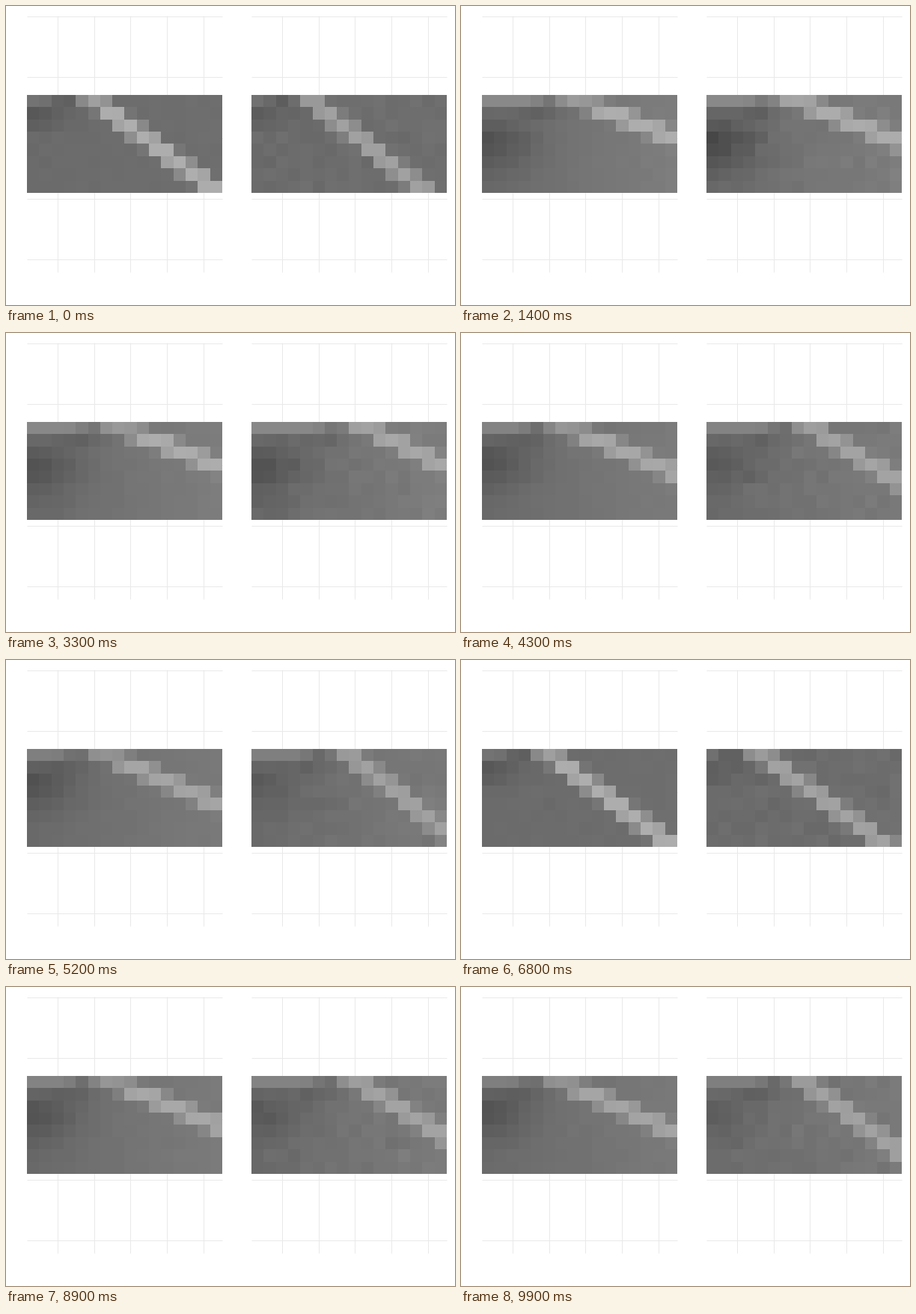
A matplotlib script for the animation above (10 s loop, 600 by 400 pixels).

```python
import numpy as np
import matplotlib.pyplot as plt
from matplotlib.animation import FuncAnimation

W, H, DPI = 600, 400, 100
COLS, ROWS = 16, 8
FRAMES, STEP = 100, 100
PANELS = (28.3, 328.3)
TOP, BOTTOM, WIDTH = 119.3, 249.8, 260.9

# Key moments in seconds; tilt runs from 0 (steep ridge) to 1 (shallow)
KEYS = (0, 1.4, 3.3, 5.2, 6.8, 7.8, 9.9)
TILT = (0, 1, 0.97, 0.75, 0, 0.98, 0.75)
RIGHT_START = (4.5, 7.1, 9.0, 7.6, 4.0, 9.0, 7.6)
RIGHT_SLOPE = (1.25, 2.45, 2.0, 1.25, 1.4, 1.85, 1.35)

C, R = np.meshgrid(np.arange(COLS), np.arange(ROWS))


def ease(t, values):
    """Smoothstep from key to key."""
    k = np.interp(t, KEYS, range(len(KEYS)))
    u = k % 1
    return np.interp(k - u + u * u * (3 - 2 * u), range(len(KEYS)), values)


def bump(x, y, sx, sy):
    return np.exp(-((C - x) / sx) ** 2 - ((R - y) / sy) ** 2)


def scene(start, slope, tilt, shade, peak, crest, noise):
    notch = start - 2.5
    row = 1.3 + 1.6 * tilt ** 2

    # plain ground, darker towards the left
    img = 107 + (3 + 15 * tilt) * C / (COLS - 1) + noise
    img -= shade * bump(0, row, 2.4 + 1.4 * tilt,
                        np.where(R < row, 1.2, 1 + 1.8 * tilt))
    img -= 13 * tilt * bump(notch - 1, 1, 2, 0.6)

    # light strip along the top, broken by a dark notch
    fade = 1 / (1 + np.exp(2 * (C[0] - start)))
    img[0] += (115 + 22 * tilt ** 2 - img[0]) * fade
    img[0] -= 22 * np.exp(-((C[0] - notch) / 1.1) ** 2)

    # bright ridge running down to the right
    dist = (C - start - slope * R) / np.hypot(1, slope)
    mask = np.exp(-(dist / 0.75) ** 4)
    mask[0] *= crest
    return img + (peak - img) * mask


def pair(n):
    t = n * STEP / 1000
    noise = np.random.default_rng(100 + n).normal(0, 1, (ROWS, COLS))
    tilt = ease(t, TILT)
    left = scene(5.1 + 2.6 * tilt ** 3, 1.35 + 1.15 * tilt, tilt,
                 20 + 5 * tilt, 174 - 12 * tilt * (1 - tilt) * 4,
                 0.75 - 0.2 * tilt, 0.6 * noise)
    slope = ease(t, RIGHT_SLOPE)
    right = scene(ease(t, RIGHT_START), slope, tilt,
                  14 + 20 * max(slope - 1.4, 0), 150 + 9 * slope,
                  0.85, 2 * noise)
    return left, right


fig = plt.figure(figsize=(W / DPI, H / DPI), dpi=DPI, facecolor="white")
ax = fig.add_axes([0, 0, 1, 1])
ax.axis("off")

images = []
for x0, data in zip(PANELS, pair(0)):
    grid = dict(color="#e9e9e9", lw=0.72, zorder=0, solid_capstyle="butt")
    for k in range(5):
        x = x0 + 40.4 + 48.8 * k
        ax.plot([x, x], [13, 356], **grid)
    for k in range(5):
        y = 14 + 81.25 * k
        ax.plot([x0, x0 + WIDTH], [y, y], **grid)
    images.append(ax.imshow(data, cmap="gray", vmin=0, vmax=255,
                            extent=(x0, x0 + WIDTH, BOTTOM, TOP),
                            interpolation="nearest", zorder=2))
ax.set_xlim(0, W)
ax.set_ylim(H, 0)
ax.set_aspect("auto")


def update(n):
    for im, data in zip(images, pair(n)):
        im.set_data(data)
    return images


anim = FuncAnimation(fig, update, frames=FRAMES, interval=STEP,
                     repeat=True, repeat_delay=0, blit=False)
plt.show()
```
